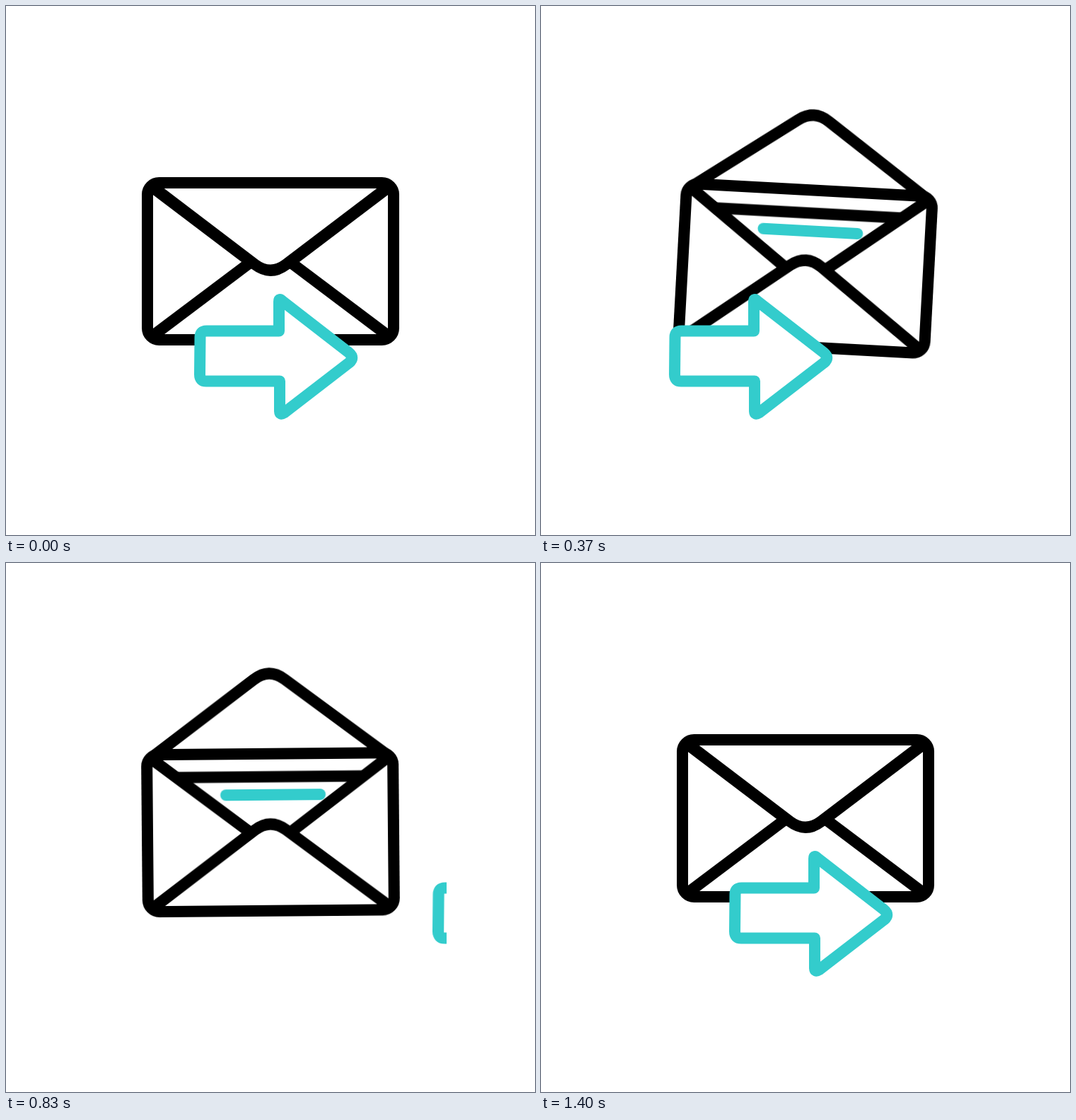
An HTML page without scripts that plays this animation: 748 by 748 pixels, repeating every 1670 ms.

```html
<!DOCTYPE html>
<html lang="en">
<head>
<meta charset="utf-8">
<title>Send mail</title>
<style>
  html, body { margin: 0; width: 100%; height: 100%; overflow: hidden; background: #fff; }
  svg { display: block; width: 100%; height: 100%; }

  .ink, .teal { fill: none; stroke: #000; stroke-width: 16; stroke-linecap: round; stroke-linejoin: round; }
  .teal { stroke: #33cccc; }
  .paper { fill: #fff; }

  .lift, .tilt, .flap, .arrow { animation: 1670ms linear infinite; }
  .lift { animation-name: lift; }
  .tilt { animation-name: tilt; transform-origin: 374px 361px; }
  .flap { animation-name: flap; }
  .arrow { animation-name: arrow; }

  @keyframes lift {
    0%, 4.19% { transform: translateY(0); animation-timing-function: cubic-bezier(.4, 0, .7, .5); }
    16.17% { transform: translateY(5px); }
    28.14% { transform: translateY(15px); }
    35.93% { transform: translateY(22.8px); animation-timing-function: ease-out; }
    41.32% { transform: translateY(24.6px); animation-timing-function: ease-in; }
    49.7% { transform: translateY(19.8px); }
    61.68% { transform: translateY(8.5px); animation-timing-function: ease-out; }
    73.65%, 100% { transform: translateY(0); }
  }

  @keyframes tilt {
    0%, 4.19% { transform: rotate(0); animation-timing-function: cubic-bezier(.37, 0, .63, 1); }
    13.17% { transform: rotate(-13deg); animation-timing-function: cubic-bezier(.37, 0, .63, 1); }
    26.35% { transform: rotate(7.7deg); animation-timing-function: cubic-bezier(.37, 0, .63, 1); }
    37.72% { transform: rotate(.3deg); }
    49.7% { transform: rotate(-.5deg); }
    60%, 100% { transform: rotate(0); }
  }

  @keyframes flap {
    0%, 4.19%, 66.47%, 100% {
      d: path("M210 257.5L352 365.5Q374 382 396 365.5L538 257.5");
      animation-timing-function: cubic-bezier(.37, 0, .63, 1);
    }
    24.55%, 49.7% {
      d: path("M210 251.5L352 145Q374 128 396 145L538 251.5");
      animation-timing-function: cubic-bezier(.37, 0, .63, 1);
    }
  }

  /* Pull back, shoot out to the right, re-enter from the left */
  @keyframes arrow {
    0%, 4.19% { transform: translateX(0); animation-timing-function: cubic-bezier(.4, 0, .65, 1); }
    26.05% { transform: translateX(-92.5px); animation-timing-function: cubic-bezier(.333, 0, .667, .333); }
    50.9% { transform: translateX(379.5px); animation-timing-function: step-end; }
    59.28% { transform: translateX(-411px); animation-timing-function: cubic-bezier(.333, .667, .667, 1); }
    83.53%, 100% { transform: translateX(0); }
  }
</style>
</head>
<body>
<svg viewBox="0 0 748 748">
  <clipPath id="lane"><rect x="125" y="390" width="498" height="210"/></clipPath>

  <g class="lift">
    <g class="tilt">
      <rect class="paper" x="200" y="250" width="348" height="222" rx="16.5"/>
      <path class="ink" d="M244 282.5H504"/>
      <path class="teal" d="M311.5 308H444.5"/>
      <path class="ink" d="M210 258.5L346 361.5M538 258.5L402 361.5"/>
      <path class="ink paper" d="M210 464.5L352 357.7Q374 341.3 396 357.7L538 464.5"/>
      <path class="ink paper flap" d="M210 257.5L352 365.5Q374 382 396 365.5L538 257.5"/>
      <rect class="ink" x="200" y="250" width="348" height="222" rx="16.5"/>
    </g>
  </g>

  <g clip-path="url(#lane)">
    <path class="teal paper arrow" d="M283.5 459.5H386V418Q386 412.5 390.5 417L485 490.3Q493.5 497.5 485 504.5L393 575.3Q387.2 579 387 573V530.5H283Q274 530.5 274 521L274.5 468.5Q274.5 459.5 283.5 459.5Z"/>
  </g>
</svg>
</body>
</html>
```
